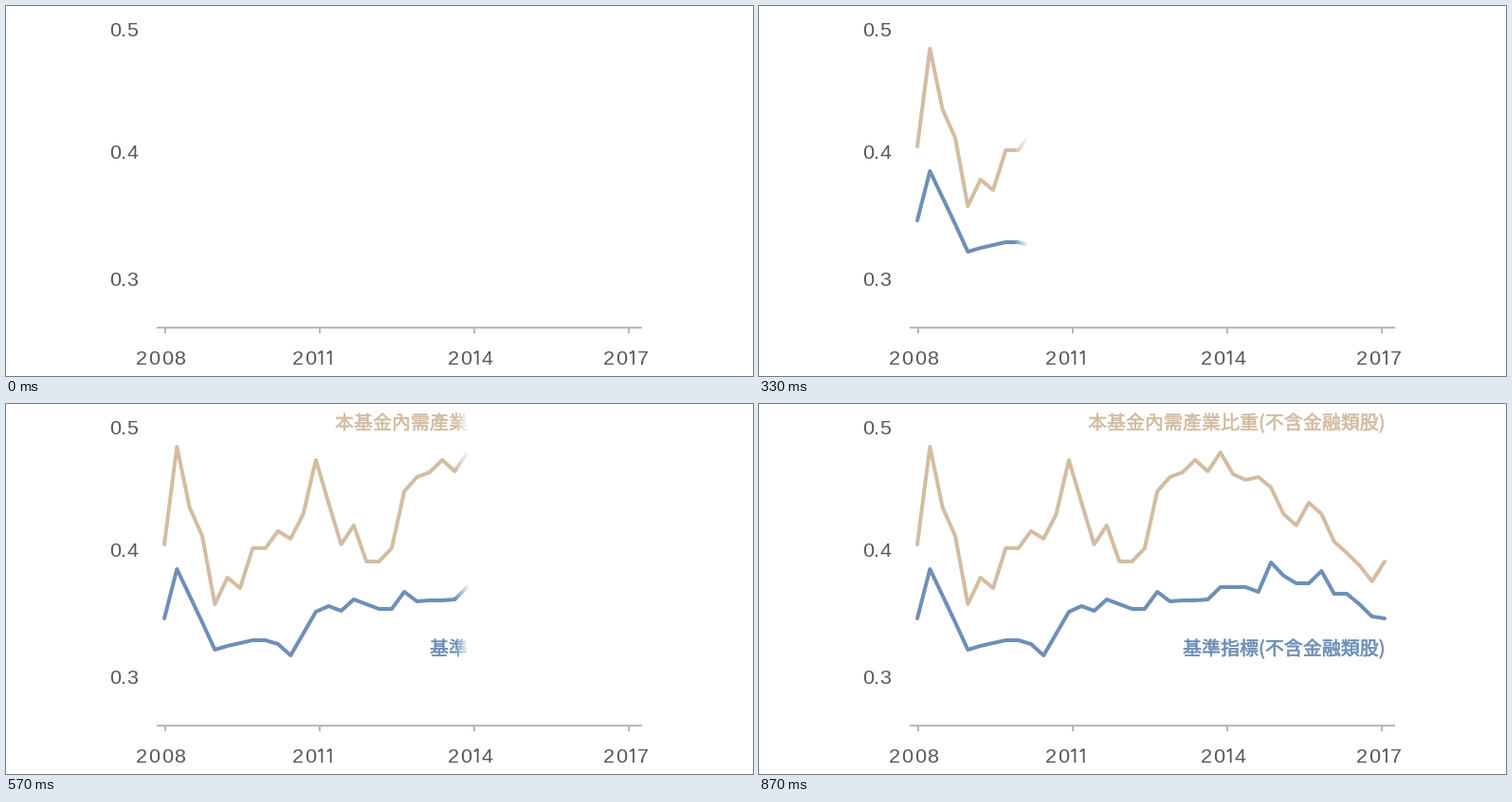
A matplotlib script that plays this animation: 788x390 px, repeating every 1.03 s.

```python
import numpy as np
import matplotlib.pyplot as plt
from matplotlib.animation import FuncAnimation
from matplotlib.patheffects import withStroke

W, H, DPI = 788, 390, 100
TICK_MS, LOOP_MS = 10, 1030
PT = 72 / DPI  # points per pixel
START_MS, STEP_MS, STEPS = 100, 100 / 3, 24

GREY, AXIS = "#58585a", "#b8b8b8"
SAND, BLUE = "#d3bda2", "#6e8fb7"

# Quarterly heights in stage pixels, evenly spaced in time.
FUND = [148, 45, 109, 139, 211, 183, 194, 152, 152, 134, 142, 116, 59,
        104, 148, 128, 166, 166, 152, 92, 77, 72, 59, 71, 51, 74,
        80, 77, 88, 116, 128, 104, 116, 145, 157, 170, 187, 166]
BENCHMARK = [226, 174, 202, 230, 259, 255, 252, 249, 249, 253, 265, 242, 219,
             213, 218, 206, 211, 216, 216, 198, 208, 207, 207, 206, 193, 193,
             193, 198, 167, 181, 189, 189, 176, 200, 200, 211, 224, 226]

fig = plt.figure(figsize=(W / DPI, H / DPI), dpi=DPI, facecolor="white")
ax = fig.add_axes([0, 0, 1, 1])
ax.axis("off")


def stroke(xs, ys, color, width, cap="butt", join="round"):
    ax.plot(xs, ys, color=color, lw=width * PT,
            solid_capstyle=cap, solid_joinstyle=join)


def number(x, baseline, text):
    """Tracked numerals; the one is a plain flag and stem."""
    for char in text:
        advance = {"1": 9.3, ".": 4.6}.get(char, 13.3)
        mid = x + advance / 2
        if char == "1":
            stem = mid + 1.2
            stroke([stem - 4, stem, stem], baseline - np.array([11.6, 14.3, 0]),
                   GREY, 1.8, join="miter")
        else:
            ax.text(mid, baseline, char, color=GREY, fontsize=21.5 * PT,
                    family="Liberation Sans", ha="center", va="baseline")
        x += advance


def series(heights, color, name, baseline):
    stroke(np.linspace(167, 660, len(heights)), heights, color, 4, cap="round")
    ax.text(660.5, baseline, name, color=color, fontsize=20 * PT,
            family="Noto Sans CJK JP", ha="right", va="baseline", zorder=1,
            path_effects=[withStroke(linewidth=0.5 * PT, foreground=color)])


stroke([159, 671], [339, 339], AXIS, 2)
for k in range(4):
    tick = 168 + 162.9 * k
    stroke([tick, tick], [339, 345], AXIS, 2)
    number(136.6 + 164.3 * k, 378, str(2008 + 3 * k))
for baseline, value in [(32, "0.5"), (161, "0.4"), (295, "0.3")]:
    number(108.5, baseline, value)

series(FUND, SAND, "本基金內需產業比重(不含金融類股)", 26.5)
series(BENCHMARK, BLUE, "基準指標(不含金融類股)", 264.5)

# A white cover with a soft left edge slides right to reveal the chart.
FADE = 15
columns = np.arange(W) + 0.5
cover = np.ones((1, W, 4))
curtain = ax.imshow(cover, extent=(0, W, 285, 0), aspect="auto",
                    interpolation="nearest", zorder=5)
ax.set_xlim(0, W)
ax.set_ylim(H, 0)


def reveal_edge(ms):
    """Right end of the visible part, eased in and out by a cosine."""
    step = int((ms - START_MS + 5) // STEP_MS)
    if step < 0:
        return 160
    if step >= STEPS - 1:
        return W + FADE
    return 171.5 + 485 * (1 - np.cos(np.pi * (step + 1) / (STEPS + 1))) / 2


def update(i):
    edge = reveal_edge(i * TICK_MS)
    alpha = np.clip((columns - edge) / FADE + 1, 0, 1)
    cover[0, :, 3] = np.where(columns < 155, 0, alpha)
    curtain.set_data(cover.copy())
    return [curtain]


anim = FuncAnimation(fig, update, frames=LOOP_MS // TICK_MS, interval=TICK_MS,
                     repeat=True, repeat_delay=0, blit=False)
plt.show()
```
